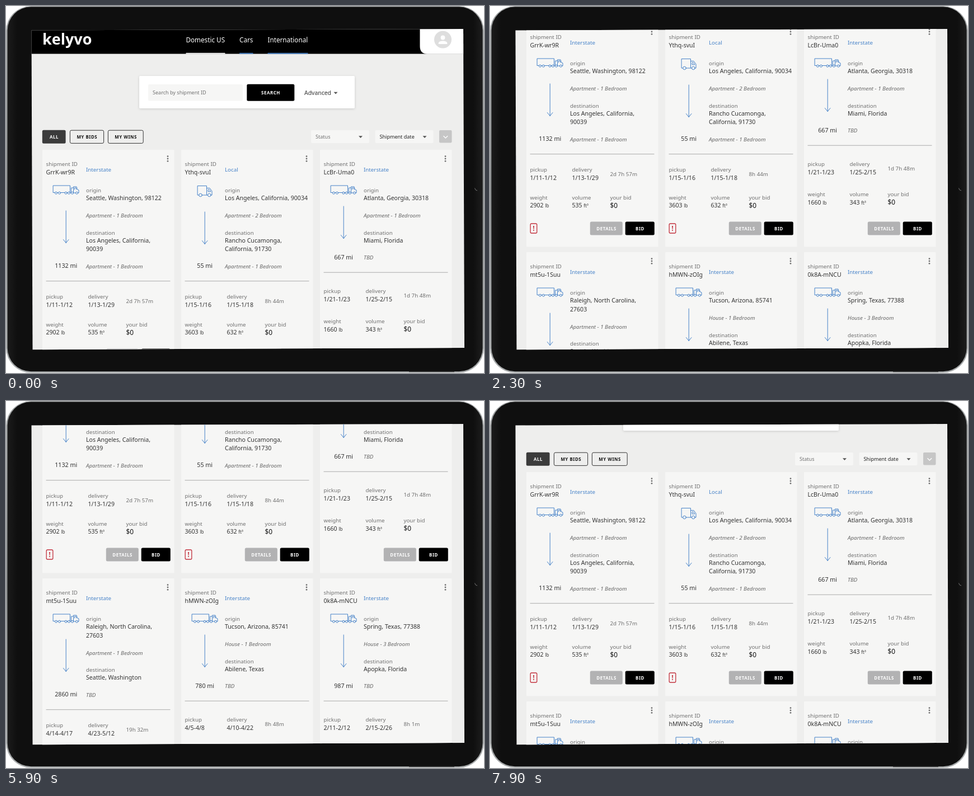
Write an HTML page that moves like this. It is 854x656 px and loops after 8000 ms.

```html
<!DOCTYPE html>
<html lang="en">
<head>
<meta charset="utf-8">
<title>Shipment board</title>
<style>
html, body { margin: 0; width: 100%; height: 100%; overflow: hidden; background: #fff; }
svg { display: block; width: 854px; height: 656px; }
text { font: 10.55px "Noto Sans", sans-serif; fill: #333; white-space: pre; }
.label { font-size: 9.75px; fill: #707070; }
.kind { font-size: 9.75px; fill: #4682c8; }
.home { font-size: 9.75px; font-style: italic; fill: #666; }
.miles { font-size: 10.7px; text-anchor: middle; }
.bid { font-size: 11.9px; fill: #111; }
.unit { font-size: 8px; }
.btn { font-size: 7.9px; font-weight: 700; letter-spacing: .55px; text-anchor: middle; fill: #fff; }
.btn.dark { fill: #111; }
.field { font-size: 9.05px; fill: #707070; }
.field.dark { fill: #222; }
.nav { font-size: 11.7px; fill: #fff; }
.adv { font-size: 10.45px; fill: #555; stroke: #555; stroke-width: .2; }
.brand { font-size: 27px; font-weight: 700; fill: #fff; }
.alert { font: 700 12px "Noto Serif", serif; fill: #c2303c; text-anchor: middle; }
.line { fill: none; stroke: #4682c8; stroke-width: 1; stroke-linejoin: round; stroke-linecap: round; }
</style>
</head>
<body>
<svg viewBox="0 0 854 656" xmlns="http://www.w3.org/2000/svg">
  <defs>
    <clipPath id="screen"><path d="M45.5 43.5 817 41 819 611 47.5 614.2Z"/></clipPath>
    <linearGradient id="rim" x2="0" y2="1">
      <stop offset="0" stop-color="#a0a3a4"/><stop offset=".5" stop-color="#7d8081"/><stop offset="1" stop-color="#a6a9aa"/>
    </linearGradient>
    <linearGradient id="body">
      <stop offset="0" stop-color="#1b1b1b"/><stop offset=".02" stop-color="#0f0f0f"/>
      <stop offset=".98" stop-color="#0f0f0f"/><stop offset="1" stop-color="#1d1d1d"/>
    </linearGradient>
    <filter id="soft" x="-5%" y="-20%" width="110%" height="140%">
      <feDropShadow dx="0" dy="1" stdDeviation="2" flood-opacity=".16"/>
    </filter>
  </defs>
  <rect x=".3" y=".3" width="853.4" height="655.2" rx="44" fill="url(#rim)"/>
  <rect x="2.6" y="1.6" width="849" height="651.6" rx="42" fill="url(#body)"/>
  <path d="M720 653.6H801" stroke="#333" stroke-width="1.5"/>
  <path d="M837.5 325.5Q838 329.5 842 330" fill="none" stroke="#747474"/>
  <g clip-path="url(#screen)">
    <rect x="40" y="35" width="785" height="585" fill="#eeeeed"/>
    <g id="page"></g>
  </g>
</svg>
<script>
const LOOP = 8000;
const page = document.getElementById('page');

const text = (x, y, s, cls = '') => `<text x="${x}" y="${y}" class="${cls}">${s}</text>`;
const box = (x, y, w, h, fill, r = 0, more = '') =>
  `<rect x="${x}" y="${y}" width="${w}" height="${h}" rx="${r}" fill="${fill}" ${more}/>`;
const path = (d, more = 'class="line"') => `<path d="${d}" ${more}/>`;
const dot = (x, y, r, more) => `<circle cx="${x}" cy="${y}" r="${r}" ${more}/>`;
const caret = (x, y) => path(`M${x - 3.5} ${y - 1.7}h7l-3.5 3.6z`, 'fill="#555"');

function header() {
  const tab = (x, w, s, color) => text(x, 65, s, 'nav') + box(x, 83.8, w, 1.8, color);
  return box(40, 30, 785, 55.5, '#000') +
    text(65, 69, 'kelyvo', 'brand') +
    tab(321.5, 70, 'Domestic US', '#fff') +
    tab(417, 24.5, 'Cars', '#4682c8') +
    tab(467.5, 72, 'International', '#4682c8') +
    path('M739.5 30H830V85.7H753Q739.5 85.7 739.5 72Z', 'fill="#fff"') +
    dot(780.5, 60, 15.5, 'fill="#dedede"') +
    dot(780.5, 56.5, 3.9, 'fill="#fff"') +
    path('M772.7 68V66.5C772.7 61 788.3 61 788.3 66.5V68Z', 'fill="#fff"');
}

function search() {
  return box(238, 125, 385, 58, '#fff', 2, 'filter="url(#soft)"') +
    box(254, 140, 169, 29.5, '#f6f6f5', 2) + text(262, 158.3, 'Search by shipment ID', 'field') +
    box(430.3, 139.8, 85, 30, '#000', 2.5) + text(473, 157.8, 'SEARCH', 'btn') +
    text(533, 158.8, 'Advanced', 'adv') + caret(589, 155.5);
}

function toolbar() {
  const outline = 'stroke="#333"';
  return box(64.8, 221.8, 41.8, 24, '#3b3b3b', 2.5) + text(86.1, 236.7, 'ALL', 'btn') +
    box(114.4, 222.2, 60.2, 23.2, 'none', 2.5, outline) + text(144.8, 236.7, 'MY BIDS', 'btn dark') +
    box(182.4, 222.2, 62.8, 23.2, 'none', 2.5, outline) + text(214.1, 236.7, 'MY WINS', 'btn dark') +
    box(545, 222, 104, 23, '#f6f6f5', 2) + text(553, 237, 'Status', 'field') + caret(633.5, 234) +
    box(659.5, 222, 104, 23, '#f6f6f5', 2) + text(667.5, 237, 'Shipment date', 'field dark') + caret(748, 234) +
    box(774, 222, 22.5, 22.5, '#c6c6c6', 2) +
    path('M781.5 232.2l3.8 3.8 3.8-3.8', 'fill="none" stroke="#fff" stroke-width="1.3"');
}

const wheel = (x, y, r) => dot(x, y, r, 'class="line" style="fill:#f6f6f5"');
const semi = () => path('M19.5 64H49.5V76.5H19.5ZM49.5 77H65V72L62.5 71 61 66H55.5V76.5M51.5 76.5V68H55.5M57.5 71V68H60L61 71') +
  [24.5, 30.5, 42, 47.5, 53.5, 61.5].map(x => wheel(x, 77.2, 2)).join('');
const van = () => path('M29.5 64.5H45.5V81H29.5ZM45.5 68.5H51L55 74V81H45.5M48 74.5V71H50.3L52.7 74.5Z') +
  wheel(34.5, 81, 2.8) + wheel(50.3, 81, 2.8);

function card(c, i) {
  const local = c.kind === 'Local';
  const lines = (y, s) => s.split('|').map((part, n) => text(78, y + n * 15.5, part)).join('');
  const pair = (x, y, name, value) => text(x, y, name, 'label') + text(x, y + 14.8, value);
  const unit = (n, u) => `${n} <tspan class="unit">${u}</tspan>`;
  const o = c.from.includes('|') ? 15.5 : 0;
  const tall = o > 0 || c.to.includes('|');
  const end = tall ? 0 : -15.5;
  const dates = tall ? 266 : 256;
  const sizes = tall ? 315.5 : 310;
  const arrow = (tall ? 109 : 101) + (local ? 2 : 0);
  const button = (x, w, s, fill) => box(x, 355.4, w, 24, fill, 2.5) + text(x + w / 2 + .3, 370.5, s, 'btn');
  const [pick, drop, left] = c.when.split(' | ');

  return `<g transform="translate(${65 + 248 * (i % 3)} ${257 + 410 * Math.floor(i / 3)})">` +
    box(0, 0, 235.5, 400.5, '#f6f6f5', 1) +
    [11.7, 16, 20.3].map(y => dot(224, y, 1.4, 'fill="#707070"')).join('') +
    text(6.5, 28.7, 'shipment ID', 'label') + text(6.5, 43.8, c.id) + text(78, 38.7, c.kind, 'kind') +
    (local ? van() : semi()) +
    path(`M42.2 ${arrow}v57.5m-4.8-6l4.8 6 4.8-6`) +
    text(78, 75.5, 'origin', 'label') + lines(90.2, c.from) + text(78, 121.3 + o, c.homes[0], 'home') +
    text(78, 151.5 + o, 'destination', 'label') + lines(165.8 + o, c.to) +
    text(78, 211.9 + end, c.homes[1], 'home') + text(42.2, 211.2 + end, c.miles + ' mi', 'miles') +
    path(`M6.5 ${234.7 + end}H228.5`, 'stroke="#aaa"') +
    pair(6.5, dates, 'pickup', pick) + pair(81.5, dates, 'delivery', drop) +
    text(149.5, dates + 7.6, left, 'label') +
    pair(6.5, sizes, 'weight', unit(c.lb, 'lb')) + pair(81.5, sizes, 'volume', unit(c.ft, 'ft³')) +
    text(149.5, sizes, 'your bid', 'label') + text(149.5, sizes + 15.4, '$0', 'bid') +
    (c.alert ? box(7.2, 359, 11.6, 17, 'none', 2, 'stroke="#c2303c" stroke-width="1.3"') + text(13, 371.8, '!', 'alert') : '') +
    button(113.8, 58, 'DETAILS', '#b2b2b3') + button(176.7, 52.1, 'BID', '#000') + '</g>';
}

const flat = 'Apartment - 1 Bedroom';
const cards = [
  { id: 'GrrK-wr9R', kind: 'Interstate', from: 'Seattle, Washington, 98122', to: 'Los Angeles, California,|90039',
    homes: [flat, flat], miles: 1132, when: '1/11-1/12 | 1/13-1/29 | 2d 7h 57m', lb: 2902, ft: 535, alert: true },
  { id: 'Ythq-svuI', kind: 'Local', from: 'Los Angeles, California, 90034', to: 'Rancho Cucamonga,|California, 91730',
    homes: ['Apartment - 2 Bedroom', flat], miles: 55, when: '1/15-1/16 | 1/15-1/18 | 8h 44m', lb: 3603, ft: 632, alert: true },
  { id: 'LcBr-Uma0', kind: 'Interstate', from: 'Atlanta, Georgia, 30318', to: 'Miami, Florida',
    homes: [flat, 'TBD'], miles: 667, when: '1/21-1/23 | 1/25-2/15 | 1d 7h 48m', lb: 1660, ft: 343 },
  { id: 'mt5u-1Suu', kind: 'Interstate', from: 'Raleigh, North Carolina,|27603', to: 'Seattle, Washington',
    homes: [flat, 'TBD'], miles: 2860, when: '4/14-4/17 | 4/23-5/12 | 19h 32m', lb: 1774, ft: 374 },
  { id: 'hMWN-zOIg', kind: 'Interstate', from: 'Tucson, Arizona, 85741', to: 'Abilene, Texas',
    homes: ['House - 1 Bedroom', 'TBD'], miles: 780, when: '4/5-4/8 | 4/10-4/22 | 8h 48m', lb: 1454, ft: 236 },
  { id: '0k8A-mNCU', kind: 'Interstate', from: 'Spring, Texas, 77388', to: 'Apopka, Florida',
    homes: ['House - 3 Bedroom', 'TBD'], miles: 987, when: '2/11-2/12 | 2/15-2/26 | 8h 1m', lb: 1271, ft: 191 },
];
page.innerHTML = header() + search() + toolbar() + cards.map(card).join('');

// Scroll position by time, sampled at uneven ticks (tenths of a second).
const stops = [[100, 0], [1500, 156], [1700, 156], [3000, 312], [4200, 442],
  [5200, 442], [5900, 350], [6500, 285], [7900, 130]];
const ticks = [0, 2, 3, 5, 6, 8, 9, 11, 13, 15, 18, 20, 22, 23, 25, 27, 29, 30, 32, 33, 35, 37, 40, 42,
  53, 55, 56, 58, 59, 60, 62, 63, 64, 65, 66, 68, 70, 71, 73, 74, 75, 76, 78, 79];

function scrollAt(t) {
  if (t <= stops[0][0]) return 0;
  const n = stops.findIndex(s => t <= s[0]);
  const [t0, y0] = stops[n - 1], [t1, y1] = stops[n];
  const p = (t - t0) / (t1 - t0);
  const eased = (p + p * p * (3 - 2 * p)) / 2;
  return Math.round(y0 + (y1 - y0) * eased);
}

const start = performance.now();
function draw() {
  const t = (performance.now() - start) % LOOP;
  const tick = ticks.filter(k => k * 100 <= t).pop() * 100;
  page.setAttribute('transform', `translate(0 ${-scrollAt(tick)})`);
  requestAnimationFrame(draw);
}
draw();
</script>
</body>
</html>
```
